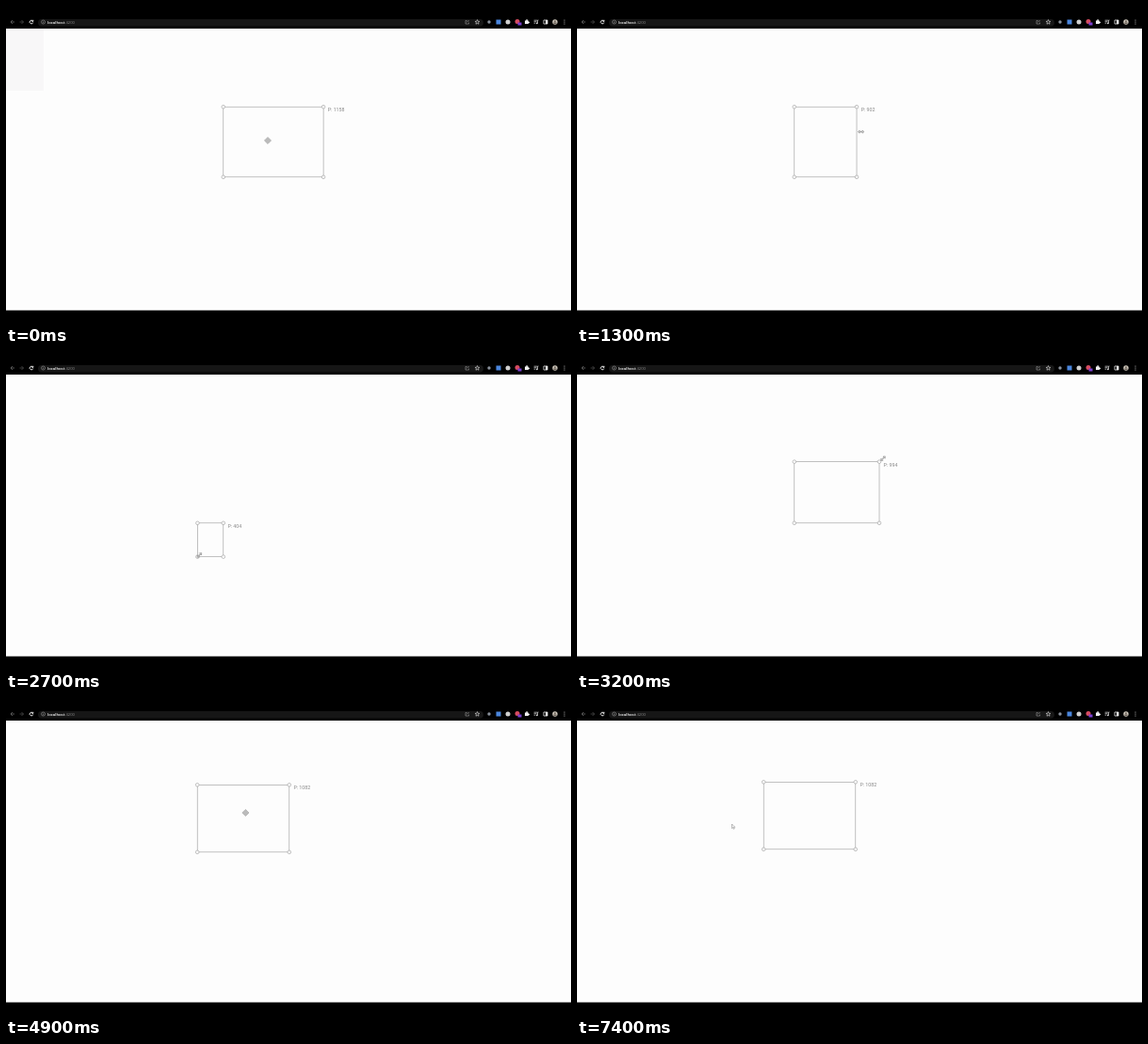
Animation, 600 px wide and 338 px high, one loop 7.6 s. Source, as an HTML page with a canvas:

```html
<!DOCTYPE html>
<html lang="en">
<head>
<meta charset="utf-8">
<title>Resizable box</title>
<style>
  html, body { margin: 0; width: 100%; height: 100%; overflow: hidden; background: #000; }
  canvas { display: block; }
</style>
</head>
<body>
<canvas id="stage" width="600" height="338"></canvas>
<script>
const ctx = document.getElementById('stage').getContext('2d');
const LOOP = 7600, STEP = 100, LAG = 30;
const LEFT = 230.8, BOTTOM = 181.8, PAGE_SCALE = 3.2;
const UI_FONT = '"Open Sans", "Noto Sans", sans-serif';
const DRAG_EDGE = 500, DRAG_CORNER = 1900, DRAG_END = 3800, MOVE_START = 4600, MOVE_END = 4900;

// Where the pointer turns or rests: [time, x, y]. The box follows the pointer.
const stops = [
  [0, 278, 143], [DRAG_EDGE, 337.1, 136], [1230, 294.5, 134], [1500, 337.1, 132],
  [DRAG_CORNER, 337.1, 107.2], [2200, 292, 127], [2650, 203, 218], [3260, 328.4, 110.3],
  [DRAG_END, 328.4, 110.3], [4300, 147, 118], [MOVE_START, 287, 143], [MOVE_END, 254.4, 122],
  [5500, 29, 17], [5800, 29, 17], [6200, 164.5, 134], [LOOP, 164.5, 134]
];

const clamp = (v, min, max) => Math.min(max, Math.max(min, v));

function slope(i, axis) {
  const a = stops[i], b = stops[i + 1];
  return a && b ? (b[axis] - a[axis]) / (b[0] - a[0]) : 0;
}

// Monotone tangent: zero at turning points, so the path never overshoots.
function tangent(i, axis) {
  const before = slope(i - 1, axis), after = slope(i, axis);
  return before * after > 0 ? 2 * before * after / (before + after) : 0;
}

function pointerAt(t) {
  const i = stops.findIndex(stop => stop[0] > t) - 1;
  const a = stops[i], b = stops[i + 1], span = b[0] - a[0], k = (t - a[0]) / span;
  const ease = k * k * (3 - 2 * k);
  const [x, y] = [1, 2].map(axis =>
    a[axis] + (b[axis] - a[axis]) * ease +
    span * k * (1 - k) * ((1 - k) * tangent(i, axis) - k * tangent(i + 1, axis)));
  return { x, y };
}

function boxAt(t) {
  const during = (start, end) => pointerAt(clamp(t - LAG, start, end));
  const right = during(DRAG_EDGE, DRAG_END).x, top = during(DRAG_CORNER, DRAG_END).y;
  const grab = pointerAt(MOVE_START), hand = during(MOVE_START, MOVE_END);
  return {
    x: Math.min(LEFT, right) + hand.x - grab.x,
    y: Math.min(BOTTOM, top) + hand.y - grab.y,
    w: Math.abs(right - LEFT),
    h: Math.abs(BOTTOM - top)
  };
}

function rect(x, y, w, h, color, radius = 0) {
  ctx.fillStyle = color;
  ctx.beginPath();
  ctx.roundRect(x, y, w, h, radius);
  ctx.fill();
}

function circle(x, y, r, fill, stroke, width = 0.7) {
  ctx.beginPath();
  ctx.arc(x, y, r, 0, Math.PI * 2);
  if (fill) { ctx.fillStyle = fill; ctx.fill(); }
  if (stroke) { ctx.strokeStyle = stroke; ctx.lineWidth = width; ctx.stroke(); }
}

function path(d, x, y, { fill, stroke, width = 0.7, angle = 0 }) {
  const shape = new Path2D(d);
  ctx.save();
  ctx.translate(x, y);
  ctx.rotate(angle);
  if (fill) { ctx.fillStyle = fill; ctx.fill(shape); }
  if (stroke) { ctx.strokeStyle = stroke; ctx.lineWidth = width; ctx.stroke(shape); }
  ctx.restore();
}

function text(str, x, y, font, color) {
  ctx.font = font;
  ctx.fillStyle = color;
  ctx.fillText(str, x, y);
  return ctx.measureText(str).width;
}

function drawToolbar() {
  rect(0, 0, 600, 24, '#000');
  rect(34, 14, 473, 7.5, '#161616', 3.7);
  const arrow = 'M2 0H-2M0 -2L-2 0L0 2';
  path(arrow, 7, 17, { stroke: '#777' });
  path(arrow, 16.5, 17, { stroke: '#555', angle: Math.PI });
  path('M1.4 -1.1A1.8 1.8 0 1 0 1.7 .6M1.8 -2.2V-.7H.3', 27, 17, { stroke: '#fff', width: 0.9 });
  circle(39.5, 17, 2, null, '#999', 0.6);
  rect(39.2, 16.5, 0.6, 1.6, '#999');
  const font = `4.2px ${UI_FONT}`;
  const width = text('localhost', 44, 18.6, '600 ' + font, '#fff');
  text(':4200', 44 + width, 18.6, font, '#888');

  path('M-.5 -1.5H-2V2H1.5V.5M-.8 .5Q-.5 -1.3 2 -1.3', 490, 17, { stroke: '#888' });
  path('M0 -2.4L.7 -.7L2.4 -.6L1.1 .5L1.5 2.2L0 1.3L-1.5 2.2L-1.1 .5L-2.4 -.6L-.7 -.7Z', 500.5, 17, { stroke: '#ccc' });
  circle(513, 17, 1.7, '#8a919c');
  rect(520.5, 14.5, 5, 5, '#4a86dd');
  circle(533, 17, 2.5, '#d0d0d0');
  circle(543, 16.5, 2.5, '#d64b60');
  rect(543.5, 17.5, 4, 3, '#7b3fd0');
  path('M-2 -1.2H-.6A.8 .8 0 1 1 .8 -1.2H1.8V.1A.8 .8 0 1 1 1.8 1.4V2.4H-2Z', 553, 16.7, { fill: '#f2f2f2' });
  path('M-2.4 -1.8H1M-2.4 -.3H.5M-2.4 1.2H-.7M2.5 -2H1.5V1.2', 563, 17, { stroke: '#ddd' });
  circle(563.9, 18.3, 0.9, '#ddd');
  path('M-2 -2H2V2H-2Z', 573, 17, { stroke: '#fff' });
  rect(573, 15, 2, 4, '#fff');
  circle(583, 17, 2.7, '#cfc8bd');
  circle(583, 16.2, 0.9, '#625950');
  rect(581.5, 17.4, 3, 1.5, '#625950');
  for (let y = 15; y <= 19; y += 2) circle(593, y, 0.5, '#ddd');
}

function drawBox({ x, y, w, h }) {
  ctx.strokeStyle = '#999';
  ctx.lineWidth = 0.6;
  ctx.strokeRect(x, y, w, h);
  for (const px of [x, x + w])
    for (const py of [y, y + h]) circle(px, py, 1.8, '#fff', '#999', 0.6);
  const perimeter = Math.round((w + h) * PAGE_SCALE) * 2;
  text('P: ' + perimeter, x + w + 4.6, y + 4.9, '5.3px Roboto, sans-serif', '#888');
}

function drawCursor(t, box) {
  const { x, y } = pointerAt(t);
  const resize = 'M-3.3 0L-1.5 -1.5V-.4H1.5V-1.5L3.3 0L1.5 1.5V.4H-1.5V1.5Z';
  const inside = x > box.x && x < box.x + box.w && y > box.y && y < box.y + box.h;
  if (t >= DRAG_EDGE && t <= DRAG_END) {
    const angle = t < 1600 ? 0 : -Math.PI / 4;
    path(resize, x, y, { fill: '#ddd', stroke: '#777', width: 0.5, angle });
  } else if (inside) {
    path('M0 -3.6L3.6 0L0 3.6L-3.6 0Z', x, y, { fill: '#bbb', stroke: '#999', width: 0.5 });
  } else {
    path('M0 0V4.6L1.1 3.6L1.9 5.3L2.7 4.9L1.9 3.3H3.3Z', x, y, { fill: '#fff', stroke: '#777', width: 0.5 });
  }
}

function drawStatus() {
  rect(0, 316, 199.5, 8, '#000', [0, 1.5, 0, 0]);
  text('Waiting for cache...', 1.3, 321.3, `600 3.6px ${UI_FONT}`, '#fff');
}

function draw(t) {
  rect(0, 0, 600, 338, '#fdfdfd');
  if (t < STEP) rect(0, 24, 40, 66, '#f8f7f8');
  const box = boxAt(t);
  drawBox(box);
  rect(0, 323.4, 600, 15, '#000');
  if (t >= 5900 && t < 6400) drawStatus();
  drawToolbar();
  drawCursor(t, box);
}

function frame() {
  const t = performance.now() % LOOP;
  draw(Math.floor(t / STEP) * STEP);
  requestAnimationFrame(frame);
}
frame();
</script>
</body>
</html>
```
